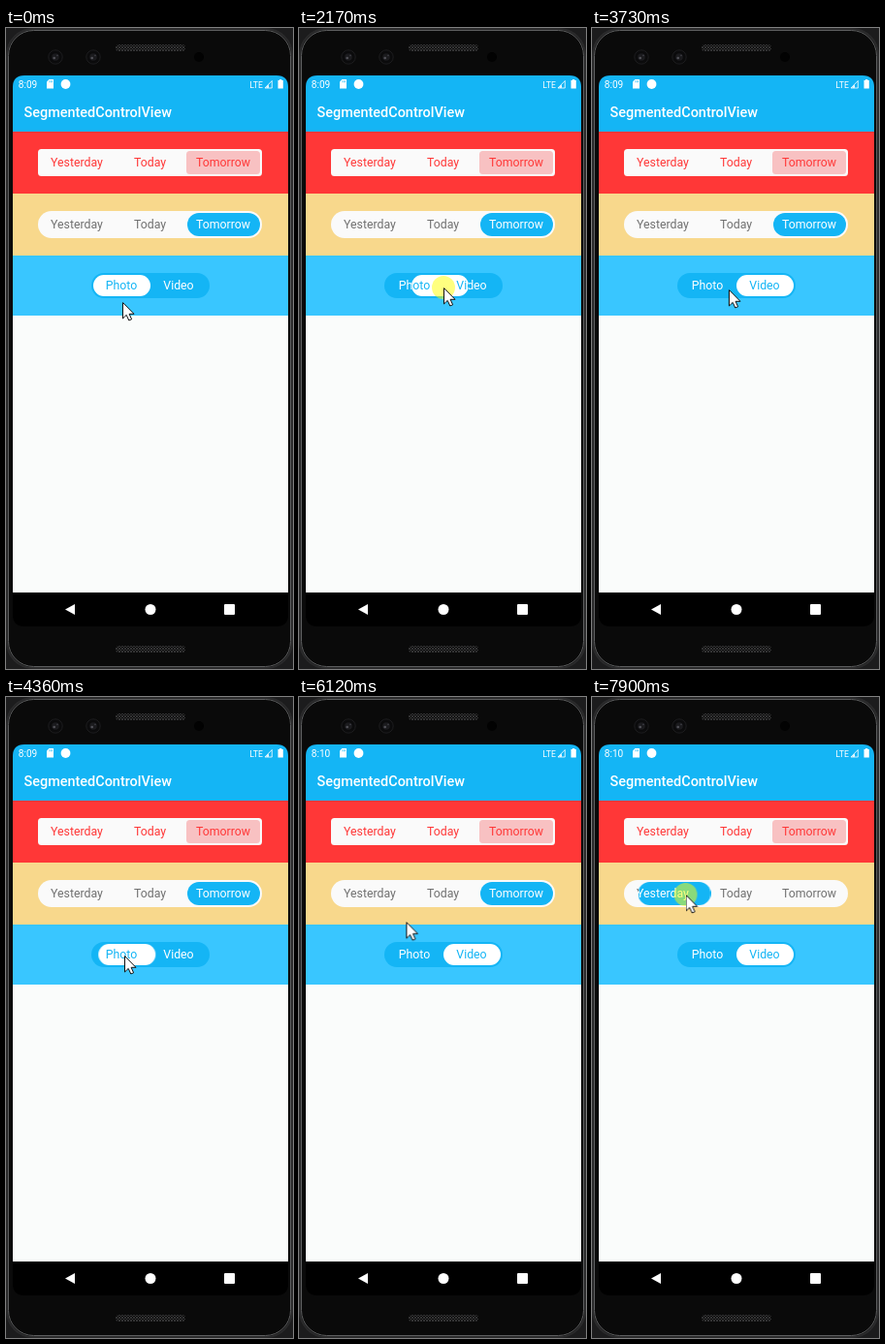
Recreate the animation shown at these times as an HTML page. Size 296 by 662 pixels, loop 7.99 s.

```html
<!DOCTYPE html>
<html lang="en">
<head>
<meta charset="utf-8">
<title>Segmented controls</title>
<style>
  html, body { margin: 0; width: 100%; height: 100%; overflow: hidden; background: #1c1c1d; }
  svg { display: block; width: 296px; height: 662px; }
  text { font-family: Roboto, "Noto Sans", sans-serif; }
  .labels { font-size: 12.3px; text-anchor: middle; }
  .media, .day, .cursor { animation: 7990ms linear infinite; }
  .media { animation-name: media; }
  .day { animation-name: day; }
  .cursor { animation-name: cursor; }
  .press, .before, .after { animation: press 7990ms step-end infinite; }
  .before { animation-name: before; }
  .after { animation-name: after; }

  @keyframes media {
    0%, 11.89% { transform: translateX(90px); }
    14.39% { transform: translateX(93.4px); }
    20.53% { transform: translateX(111px); }
    21.28%, 22.6% { transform: translateX(112px); }
    23.53%, 25.4% { transform: translateX(115px); }
    27.16%, 29.41% { transform: translateX(116px); }
    33.79% { transform: translateX(137px); }
    36.92%, 50.44% { transform: translateX(149px); }
    51.44% { transform: translateX(138px); }
    53.5% { transform: translateX(103px); }
    55.32%, 62.08% { transform: translateX(90px); }
    64.46% { transform: translateX(118px); }
    65.96% { transform: translateX(145px); }
    66.96%, 100% { transform: translateX(149px); }
  }
  @keyframes day {
    0%, 82.35% { transform: translateX(187px); }
    84% { transform: translateX(115px); }
    85.61% { transform: translateX(52.5px); }
    87.48%, 96% { transform: translateX(35px); }
    98.87%, 100% { transform: translateX(47.5px); }
  }
  @keyframes cursor {
    0%, 1% { transform: translate(120px, 283px); }
    6.76%, 11% { transform: translate(121px, 267px); }
    14.39% { transform: translate(128px, 267px); }
    20.53% { transform: translate(145px, 267px); }
    21.28%, 22.6% { transform: translate(146px, 268px); }
    23.53%, 25.4% { transform: translate(148px, 268px); }
    27.16%, 29.41% { transform: translate(149px, 268px); }
    33.79% { transform: translate(170px, 269px); }
    39.05%, 39.92% { transform: translate(172px, 281px); }
    46.68% { transform: translate(141px, 270px); }
    49.44%, 62.08% { transform: translate(122px, 267px); }
    65.96% { transform: translate(164.5px, 268px); }
    69.46% { transform: translate(174px, 285px); }
    71.84%, 72.34% { transform: translate(176px, 281px); }
    78.72%, 80.73% { transform: translate(78px, 208px); }
    85.61%, 91.11% { transform: translate(78px, 205px); }
    93.12%, 95.5% { transform: translate(83px, 204px); }
    98.87%, 100% { transform: translate(96.5px, 204px); }
  }
  @keyframes press {
    0%, 33.7%, 52.3%, 65.2%, 82.6% { opacity: 0; }
    10.6%, 49.4%, 62%, 80.7%, 95.9%, 100% { opacity: .5; }
  }
  @keyframes before { 0% { opacity: 1; } 62.9%, 100% { opacity: 0; } }
  @keyframes after { 0% { opacity: 0; } 62.9%, 100% { opacity: 1; } }
</style>
</head>
<body>
<svg viewBox="0 0 296 662">
  <defs>
    <clipPath id="screen"><path d="M7 583V61Q7 49 19 49H279Q291 49 291 61V583Z"/></clipPath>
    <clipPath id="mediaClip"><rect class="media" y="255" width="59" height="22" rx="11"/></clipPath>
    <clipPath id="dayClip"><rect class="day" y="191" width="75" height="24" rx="12"/></clipPath>
    <pattern id="mesh" width="3" height="3" patternUnits="userSpaceOnUse">
      <rect width="3" height="3" fill="#0c0c0c"/>
      <path d="M0 0L3 3M3 0L0 3" stroke="#424243" stroke-width=".7"/>
    </pattern>
    <g id="days" class="labels">
      <text x="73" y="143.3">Yesterday</text>
      <text x="148.5" y="143.3">Today</text>
      <text x="224" y="143.3">Tomorrow</text>
    </g>
    <g id="kinds" class="labels">
      <text x="119" y="270.3">Photo</text>
      <text x="178" y="270.3">Video</text>
    </g>
    <g id="lens">
      <circle r="7.2" fill="#0b0b0c" stroke="#1d1d1f"/>
      <circle r="3.8" fill="#1b1b1e"/>
      <circle cx="-1.3" cy="1" r="1.3" fill="#515158"/>
      <circle cx="2" cy="-1.6" r=".8" fill="#3f3f46"/>
    </g>
    <rect id="speaker" x="113" width="72" height="7" rx="3.5" fill="url(#mesh)"/>
  </defs>

  <!-- phone body -->
  <rect width="296" height="662" fill="#1c1c1d"/>
  <rect x="1" y="1" width="294" height="660" rx="27" fill="#0a0a0a" stroke="#2b2b2c" stroke-width="2"/>
  <rect x="2.5" y="2.5" width="291" height="657" rx="26" fill="#0a0a0a" stroke="#5c5d5e"/>
  <use href="#lens" x="51" y="30"/>
  <use href="#lens" x="90" y="30"/>
  <circle cx="199" cy="30" r="5" fill="#020202"/>
  <use href="#speaker" y="17"/>
  <use href="#speaker" y="638"/>
  <path d="M7 582H291V606Q291 618 279 618H19Q7 618 7 606Z"/>

  <g clip-path="url(#screen)">
    <rect x="7" y="49" width="284" height="58" fill="#14b5f5"/>
    <rect x="7" y="107" width="284" height="64" fill="#ff3737"/>
    <rect x="7" y="171" width="284" height="64" fill="#f8d88c"/>
    <rect x="7" y="235" width="284" height="62" fill="#39c6ff"/>
    <rect x="7" y="297" width="284" height="286" fill="#fafcfb"/>
  </g>

  <!-- status and title bars -->
  <g fill="#fff">
    <g font-size="10.1">
      <text class="before" x="12.8" y="61.8">8:09</text>
      <text class="after" x="12.8" y="61.8">8:10</text>
    </g>
    <path d="M44.5 53H49V62.5H42V55.5Z"/>
    <path d="M44.9 54.3v2M46.2 54.3v2M47.5 54.3v2" stroke="#14b5f5" stroke-width=".6"/>
    <circle cx="61.5" cy="58" r="4.9"/>
    <text x="251.3" y="61.6" font-size="8.7">LTE</text>
    <path d="M274.3 54.5V62H267Z" fill="none" stroke="#fff" stroke-width=".8"/>
    <path d="M268 61.8L271 58.5V61.8Z"/>
    <path d="M280.5 54H282V53H284.3V54H285.8V62.5H280.5Z"/>
    <text x="18.5" y="92.3" font-size="14.45" font-weight="500">SegmentedControlView</text>
  </g>

  <!-- square day picker -->
  <rect x="33" y="125" width="231" height="28" rx="3.5" fill="#fafafa"/>
  <rect x="186" y="127" width="76" height="24" rx="3.5" fill="#f8c1c2"/>
  <use href="#days" fill="#ff3737"/>

  <!-- round day picker -->
  <rect x="33" y="189" width="231" height="28" rx="14" fill="#fafafa"/>
  <use href="#days" y="64" fill="#707070"/>
  <rect class="day" y="191" width="75" height="24" rx="12" fill="#14b5f5"/>
  <g clip-path="url(#dayClip)"><use href="#days" y="64" fill="#fff"/></g>

  <!-- media picker -->
  <rect x="88" y="253" width="122" height="26" rx="13" fill="#14b5f5"/>
  <use href="#kinds" fill="#fff"/>
  <rect class="media" y="255" width="59" height="22" rx="11" fill="#fff"/>
  <g clip-path="url(#mediaClip)"><use href="#kinds" fill="#14b5f5"/></g>

  <!-- navigation bar -->
  <g fill="#fff">
    <path d="M61 600.5L71 595V606Z"/>
    <circle cx="149" cy="600.5" r="5.5"/>
    <rect x="225" y="595" width="11" height="11" rx="1"/>
  </g>

  <g class="cursor">
    <circle class="press" r="12" fill="#ff0"/>
    <path d="M.5 .6V17L4.2 13.4L6.8 19L9.6 17.8L7.1 12.3H12Z" fill="#fff" stroke="#111" stroke-linejoin="round"/>
  </g>
</svg>
</body>
</html>
```
